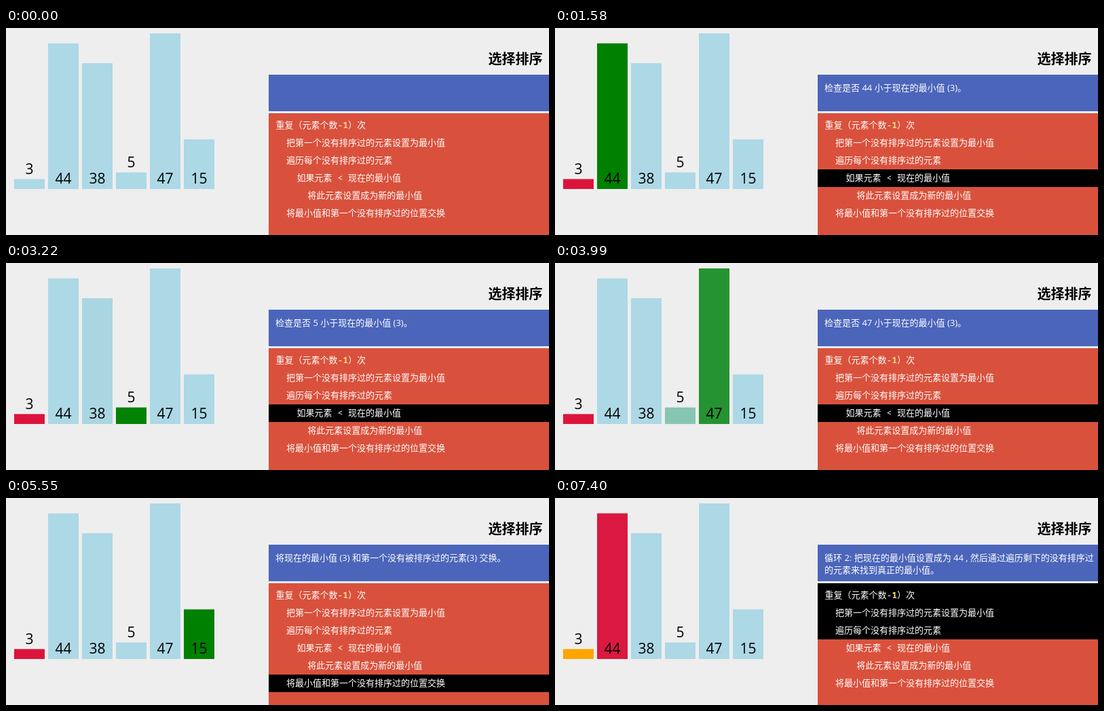
An HTML page that plays this animation: 800x306 px, repeating every 8 s.

```html
<!DOCTYPE html>
<html lang="zh-CN">
<head>
<meta charset="utf-8">
<title>选择排序</title>
<style>
html, body { margin: 0; width: 100%; height: 100%; overflow: hidden; background: #eee; }
svg { display: block; }
text { white-space: pre; }
.label { font: 21px "Open Sans", sans-serif; text-anchor: middle; }
.title { font: bold 20px "Noto Sans CJK SC", "Noto Sans CJK", sans-serif; text-anchor: end; }
.status { font: 500 13px "Open Sans", "Noto Sans CJK SC", "Noto Sans CJK", sans-serif; fill: #fff; }
.code { font: 13px "Noto Sans Mono", "Noto Sans CJK SC", "Noto Sans CJK", monospace; fill: #fff; }
.number { font-weight: bold; fill: #ffd97f; }
</style>
</head>
<body>
<svg id="stage" width="800" height="306"></svg>
<script>
const LOOP = 8000, STEP = 73, BASE = 238;
const values = [3, 44, 38, 5, 47, 15];
const code = [
  [0, '重复（元素个数-<tspan class="number">1</tspan>）次'],
  [2, '把第一个没有排序过的元素设置为最小值'],
  [2, '遍历每个没有排序过的元素'],
  [4, '如果元素 &lt; 现在的最小值'],
  [6, '将此元素设置成为新的最小值'],
  [2, '将最小值和第一个没有排序过的位置交换'],
];

// b: idle, r: minimum, g: being compared, o: sorted
const palette = { b: [173, 216, 230], r: [220, 20, 60], g: [0, 128, 0], o: [255, 165, 0] };
// eased colour fade, held at a few steps
const fades = { 3: [0.13, 0.78, 0.98], 4: [0, 0.23, 0.89, 1] };
// highlighted band as [top, height]
const none = [0, 0], loopRows = [126, 83], testRow = [209, 26], swapRow = [261, 26];

const pick = n => [`循环 ${n}: 把现在的最小值设置成为 ${values[n - 1]} , 然后通过遍历剩下的没有排序过`, '的元素来找到真正的最小值。'];
const check = n => [`检查是否 ${n} 小于现在的最小值 (3)。`];

// start time, fade steps, bar colours, band, message
const states = [
  [0, 3, 'bbbbbb', none, []],
  [500, 4, 'rbbbbb', loopRows, pick(1)],
  [1360, 4, 'rgbbbb', testRow, check(44)],
  [2210, 3, 'rbgbbb', testRow, check(38)],
  [3070, 3, 'rbbgbb', testRow, check(5)],
  [3910, 3, 'rbbbgb', testRow, check(47)],
  [4690, 4, 'rbbbbg', testRow, check(15)],
  [5550, 4, 'rbbbbb', swapRow, ['将现在的最小值 (3) 和第一个没有被排序过的元素(3) 交换。']],
  [6390, 3, 'obbbbb', swapRow, ['现在 3 被认为是排序过的了。']],
  [7250, 3, 'orbbbb', loopRows, pick(2)],
];

const rect = (x, y, w, h, attrs) => `<rect x="${x}" y="${y}" width="${w}" height="${h}" ${attrs}/>`;
const text = (x, y, cls, body = '') => `<text x="${x}" y="${y}" class="${cls}">${body}</text>`;

const stage = document.getElementById('stage');
stage.innerHTML =
  values.map((v, i) => {
    const x = 12 + 50 * i, h = v * 230 / 47;
    const labelY = h < 30 ? BASE - h - 7.3 : 230;
    return rect(x, BASE - h, 45, h, 'class="bar"') + text(x + 22.5, labelY, 'label', v);
  }).join('') +
  text(790.5, 52.5, 'title', '选择排序') +
  rect(387, 69, 413, 54, 'fill="#4b65ba"') +
  rect(387, 126, 413, 180, 'fill="#d9513c"') +
  rect(387, 0, 413, 0, 'id="band"') +
  text(397, 93, 'status') + text(397, 111, 'status') +
  code.map(([indent, line], i) => text(397.4 + 7.8 * indent, 148 + 26 * i, 'code', line)).join('');

const bars = stage.querySelectorAll('.bar');
const lines = stage.querySelectorAll('.status');
const band = document.getElementById('band');

function draw(t) {
  const n = states.findLastIndex(s => s[0] <= t);
  const [start, steps, colours, [top, height], message] = states[n];
  const before = states[Math.max(0, n - 1)][2];
  const fade = fades[steps][Math.min(steps - 1, Math.floor((t - start) / STEP))];

  bars.forEach((bar, i) => {
    const from = palette[before[i]], to = palette[colours[i]];
    const mix = from.map((c, k) => Math.round(c + (to[k] - c) * fade));
    bar.setAttribute('fill', `rgb(${mix})`);
  });
  band.setAttribute('y', top);
  band.setAttribute('height', height);
  lines.forEach((line, i) => { line.textContent = message[i] || ''; });
}

const origin = performance.now();
function tick() {
  draw((performance.now() - origin) % LOOP);
  requestAnimationFrame(tick);
}
tick();
</script>
</body>
</html>
```
